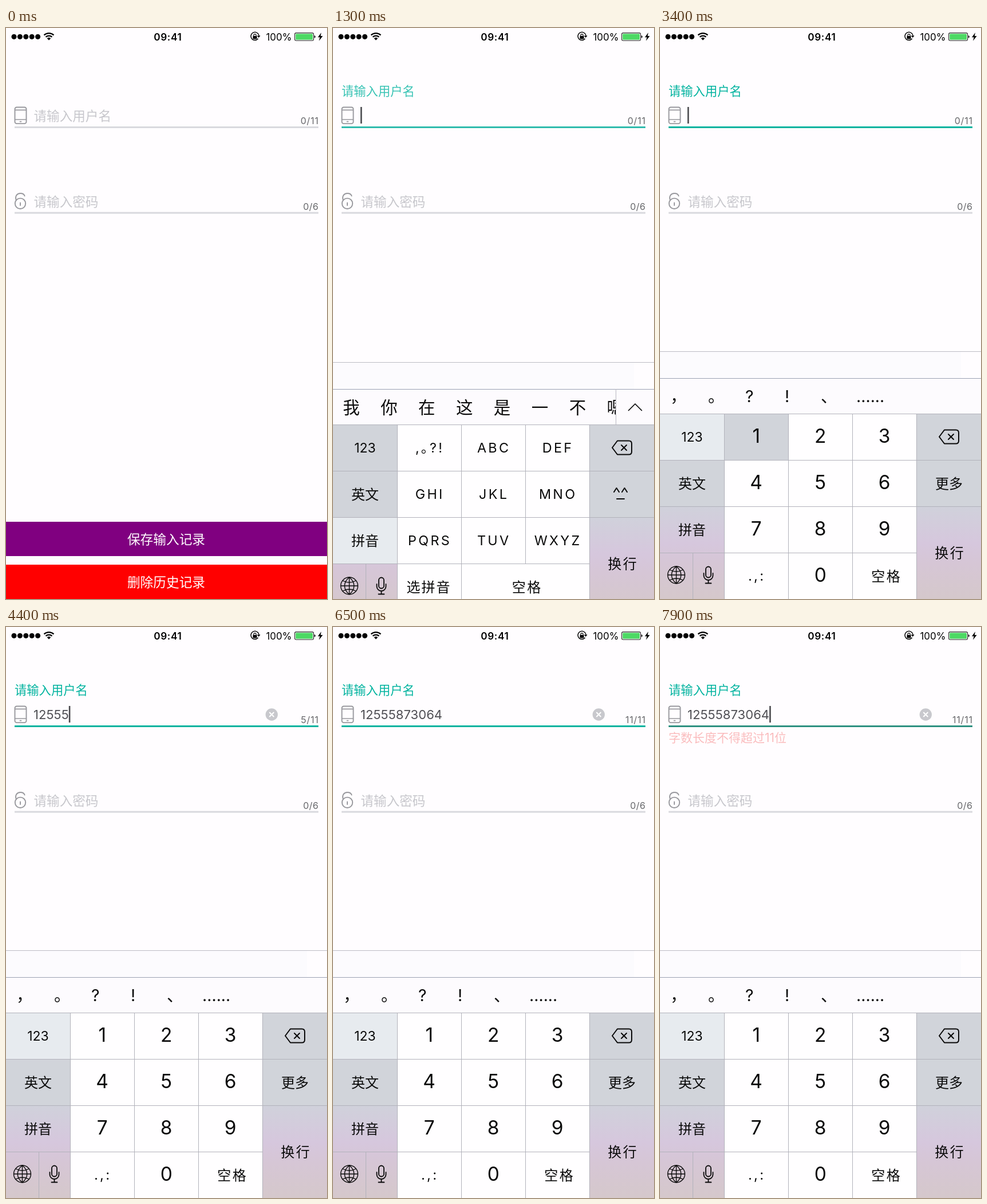
Recreate the animation shown at these times as an HTML page. Size 561x998 px, loop 8 s.

```html
<!DOCTYPE html>
<html lang="zh-CN">
<head>
<meta charset="utf-8">
<title>输入框</title>
<style>
  html, body { margin: 0; width: 100%; height: 100%; overflow: hidden; background: #fffdff; }
  svg { display: block; width: 561px; height: 998px; }
  text { font-family: Inter, "Noto Sans CJK SC", "Noto Sans CJK", sans-serif; white-space: pre; }
  .ico { fill: none; stroke: #98989d; stroke-width: 1.9; stroke-linecap: round; stroke-linejoin: round; }
  .sym { fill: none; stroke: #0a0a0a; stroke-width: 2; stroke-linecap: round; stroke-linejoin: round; }
</style>
</head>
<body>
<svg viewBox="0 0 561 998" xmlns="http://www.w3.org/2000/svg">
  <defs>
    <linearGradient id="tint" gradientUnits="userSpaceOnUse" x1="0" y1="836" x2="0" y2="998">
      <stop offset="0" stop-color="#d0d1db"/>
      <stop offset=".4" stop-color="#d6c7dd"/>
      <stop offset=".6" stop-color="#d6c6d6"/>
      <stop offset="1" stop-color="#d5c8cb"/>
    </linearGradient>
    <clipPath id="bar"><rect y="612" width="494" height="62"/></clipPath>
  </defs>
  <rect width="561" height="998" fill="#fffdff"/>

  <g id="status">
    <path d="M66.5 12.5a12.5 12.5 0 0 1 17 0M69.5 15.8a8 8 0 0 1 11 0" fill="none" stroke="#000" stroke-width="2.2"/>
    <path d="M75 21.5l-3.3-3.4a4.8 4.8 0 0 1 6.6 0z"/>
    <path d="M440.6 18.5a7 7 0 1 1 1.4-4" fill="none" stroke="#000" stroke-width="1.4"/>
    <path d="M438.6 13.6h6l-3 3.4z"/>
    <rect x="431.5" y="14" width="7" height="5.3" rx=".6"/>
    <path d="M433 14v-1.3a2 2 0 0 1 4 0V14" fill="none" stroke="#000" stroke-width="1.2"/>
    <rect x="504.6" y="8.6" width="33" height="13.4" rx="2.4" fill="none" stroke="#222" stroke-width="1.1"/>
    <rect x="506.2" y="10.2" width="29.8" height="10.2" rx="1.2" fill="#4cd964"/>
    <path d="M538.8 12.8a2.6 2.6 0 0 1 0 5z"/>
    <path d="M551 8l-6 8.2h3.6L547 22.5l6.6-8.6h-3.8z"/>
  </g>

  <g class="ico">
    <rect x="15.5" y="138.5" width="20" height="28.6" rx="3.2"/>
    <path d="M16 143.4h19M16 160h19" stroke-width="1.6"/>
    <path d="M24.5 163.6h2"/>
    <circle cx="25" cy="306.8" r="9.2"/>
    <path d="M25 305.5v4.5M17.6 300.5c-2-7 1.800-11.500 7.400-11.500 4 0 6.800 1.800 7.600 4.600"/>
  </g>
  <g id="form"></g>
  <rect id="line" x="15" y="172" width="531" height="3"/>
  <rect x="15" y="321.6" width="531" height="3" fill="#d9d9de"/>
  <g id="clear">
    <circle cx="464.300" cy="153" r="10.700" fill="#c8c8cd"/>
    <path d="M460.300 149l8 8m0-8l-8 8" stroke="#fff" stroke-width="2"/>
  </g>
  <rect id="caret" y="138" width="2.600" height="29" fill="#4a4a4e"/>

  <rect y="863" width="561" height="60" fill="#800080"/>
  <rect y="938" width="561" height="60" fill="#f00"/>
  <g id="buttons"></g>

  <g id="board">
    <rect y="565" width="561" height="433" fill="#fffdff"/>
    <rect y="565" width="526" height="109" fill="#fcfbfe"/>
    <rect y="612" width="561" height="62" fill="#fdfbfe"/>
    <path d="M0 565.500h561" stroke="#bcbcc3"/>
    <path d="M0 612.500h561" stroke="#9ba1b3"/>
    <g id="pinyin"></g>
    <g id="digits"></g>
    <g id="shared"></g>
  </g>
</svg>
<script>
const NS = 'http://www.w3.org/2000/svg';
const $ = id => document.getElementById(id);
const LOOP = 8000, FOCUS = 950, SWITCH = 2900, ERROR = 7800;
const NUMBER = '12555873064';
const FIRST = 3500, STEP = 210, HOLD = 110;
const COLS = [-.5, 112.5, 224.5, 336.5, 448.5, 561.5];
const ROWS = [674.5, 755.5, 836.5, 917.5, 998.5];
const GREY = '#d1d4da', LIGHT = '#e7ebef', WHITE = '#fffeff', TINT = 'url(#tint)';

function add(parent, tag, attrs) {
  const el = document.createElementNS(NS, tag);
  for (const k in attrs) el.setAttribute(k, attrs[k]);
  return $(parent).appendChild(el);
}

// cy is the optical middle of the line; the last letter's spacing is compensated
function label(parent, str, x, cy, size, fill = '#0a0a0a', anchor = 'middle', gap = 0, weight = 400) {
  const trail = { start: 0, middle: gap / 2, end: gap }[anchor];
  const el = add(parent, 'text', {
    x: x + trail,
    y: cy + size * (/[\u4e00-\u9fff]/.test(str) ? .38 : .364),
    'font-size': size, fill, 'text-anchor': anchor, 'letter-spacing': gap, 'font-weight': weight
  });
  el.textContent = str;
  return el;
}

function key(parent, c, r, fill, str = '', { size = 24, gap = 0, cols = 1, rows = 1, dx = 0, dy = 0 } = {}) {
  const x = COLS[c], y = ROWS[r], width = COLS[c + cols] - x, height = ROWS[r + rows] - y;
  const rect = add(parent, 'rect', { x, y, width, height, fill, stroke: '#b2b2bb' });
  label(parent, str, x + width / 2 + dx, y + 40 + dy, size, '#0a0a0a', 'middle', gap);
  return rect;
}

function sym(parent, d, width = 2) {
  add(parent, 'path', { d, class: 'sym', style: `stroke-width: ${width}` });
}

// status bar
for (let i = 0; i < 5; i++) add('status', 'circle', { cx: 14 + i * 10.4, cy: 15.3, r: 4.5 });
label('status', '09:41', 282.5, 15.5, 17.3, '#000', 'middle', .6, 600);
label('status', '100%', 499.5, 15.5, 17, '#000', 'end');

// form
const hint = label('form', '请输入用户名', 48.5, 153, 22.6, '#c7c7cc', 'start');
label('form', '请输入密码', 48.5, 303, 22.6, '#c7c7cc', 'start');
const title = label('form', '请输入用户名', 15, 110, 21.3, '#00b39f', 'start');
const value = label('form', '', 48, 153, 22.1, '#505055', 'start');
const count = label('form', '0/11', 546, 162, 16, '#67676b', 'end', .8);
label('form', '0/6', 546, 311.7, 16, '#67676b', 'end', .5);
const error = label('form', '字数长度不得超过11位', 15, 193, 21, '#f02020', 'start');
label('buttons', '保存输入记录', 280, 893.5, 22.7, '#fff');
label('buttons', '删除历史记录', 280, 968.5, 22.7, '#fff');

// pinyin layout
add('pinyin', 'g', { id: 'words', 'clip-path': 'url(#bar)' });
[...'我你在这是一不嗯'].forEach((ch, i) => label('words', ch, 32 + i * 65.9, 643.5, 29.5));
key('pinyin', 0, 0, GREY, '123', { size: 23 });
key('pinyin', 0, 1, GREY, '英文');
key('pinyin', 0, 2, LIGHT, '拼音');
[',｡?!', 'ABC', 'DEF', 'GHI', 'JKL', 'MNO', 'PQRS', 'TUV', 'WXYZ'].forEach((s, i) =>
  key('pinyin', 1 + i % 3, Math.floor(i / 3), WHITE, s, { size: 23.4, gap: 3.3, dx: -1 }));
key('pinyin', 1, 3, WHITE, '选拼音', { gap: 2, dx: -2 });
key('pinyin', 2, 3, WHITE, '空格', { gap: 2.5, cols: 2, dx: 1.5 });
key('pinyin', 4, 1, GREY);
sym('pinyin', 'M491 792l4.500-7 4.500 7M505 792l4.500-7 4.500 7M496 804h13');
add('pinyin', 'path', { d: 'M494.500 612v62', stroke: '#b8b8c0' });
sym('pinyin', 'M516.500 649.500l11.500-11.500 11.500 11.500', 1.7);

// number layout
const marks = [['，', 18], ['。', 84], ['?', 149], ['!', 218], ['、', 281], ['......', 343]];
for (const [ch, x] of marks) label('digits', ch, x, 643.5, 28.5, '#0a0a0a', 'start');
key('digits', 0, 0, LIGHT, '123', { size: 23 });
key('digits', 0, 1, GREY, '英文');
key('digits', 0, 2, TINT, '拼音');
const big = { size: 33.5, dx: -.3, dy: -2 };
const pads = [];
for (let n = 1; n < 10; n++)
  pads[n] = key('digits', (n - 1) % 3 + 1, Math.floor((n - 1) / 3), WHITE, n, big);
key('digits', 1, 3, WHITE, '.,:', { gap: 3.2, dx: -1 });
pads[0] = key('digits', 2, 3, WHITE, '0', big);
key('digits', 3, 3, WHITE, '空格', { gap: 2.5, dx: 2 });
key('digits', 4, 1, GREY, '更多');

// keys common to both layouts
key('shared', 4, 0, GREY);
sym('shared', 'M497 702.500h20q5 0 5 5v14q0 5-5 5h-20l-9-12z');
sym('shared', 'M504 710l9 9m0-9l-9 9');
key('shared', 4, 2, TINT, '', { rows: 2 });
label('shared', '换行', 505.5, 916.5, 24, '#0a0a0a', 'middle', 2.5);
key('shared', 0, 3, TINT);
add('shared', 'path', { d: 'M57.500 917v81', stroke: '#b2b2bb' });
sym('shared', 'M13.500 956a15 15 0 1 0 30 0a15 15 0 1 0-30 0h30M28.500 941v30M28.500 941c-11 9-11 21 0 30c11-9 11-21 0-30M17 947q11.500 6 23 0M17 965q11.500-6 23 0', 1.4);
sym('shared', 'M80 946a4.500 4.500 0 0 1 9 0v10a4.500 4.500 0 0 1-9 0zM76.500 953v4a8 8 0 0 0 16 0v-4M84.500 965v5M79.500 970.500h10', 1.8);

const clamp = v => Math.max(0, Math.min(1, v));
const mix = (a, b, p) => a.map((v, i) => Math.round(v + (b[i] - v) * p));

function caretAlpha(t, typed) {
  const since = t - (typed ? FIRST + (typed - 1) * STEP : FOCUS);
  if (since < 750) return since < 0 ? 0 : 1;
  const p = (since - 750) % 1000;
  return p < 300 ? clamp(1 - p / 120) : clamp((p - 300) / 180);
}

function draw(t) {
  const focused = t >= FOCUS;
  const typed = t < FIRST ? 0 : Math.min(NUMBER.length, Math.floor((t - FIRST) / STEP) + 1);
  const fade = clamp((t - FOCUS) / 450);
  const fail = clamp((t - ERROR) / 350);

  const s = Math.max(0, t - FOCUS) * .014;
  $('board').setAttribute('transform', `translate(0 ${Math.round(433 * (1 + s) * Math.exp(-s))})`);
  $('board').style.display = focused ? '' : 'none';
  $('pinyin').style.display = t < SWITCH ? '' : 'none';
  $('digits').style.display = t < SWITCH ? 'none' : '';

  hint.style.display = focused ? 'none' : '';
  title.style.opacity = fade;
  error.style.opacity = fail;
  const teal = mix([217, 217, 222], [0, 179, 159], fade);
  $('line').setAttribute('fill', `rgb(${mix(teal, [200, 30, 30], fail * .8)})`);

  value.textContent = NUMBER.slice(0, typed);
  count.textContent = typed + '/11';
  $('clear').style.display = typed ? '' : 'none';
  $('caret').setAttribute('x', 48 + (typed ? value.getComputedTextLength() : 0));
  $('caret').style.opacity = caretAlpha(t, typed);

  const down = typed < NUMBER.length && t >= FIRST + typed * STEP - HOLD ? +NUMBER[typed] : -1;
  pads.forEach((pad, n) => pad.setAttribute('fill', n === down ? GREY : WHITE));
}

const start = performance.now();
function tick() {
  draw((performance.now() - start) % LOOP);
  requestAnimationFrame(tick);
}
tick();
</script>
</body>
</html>
```
